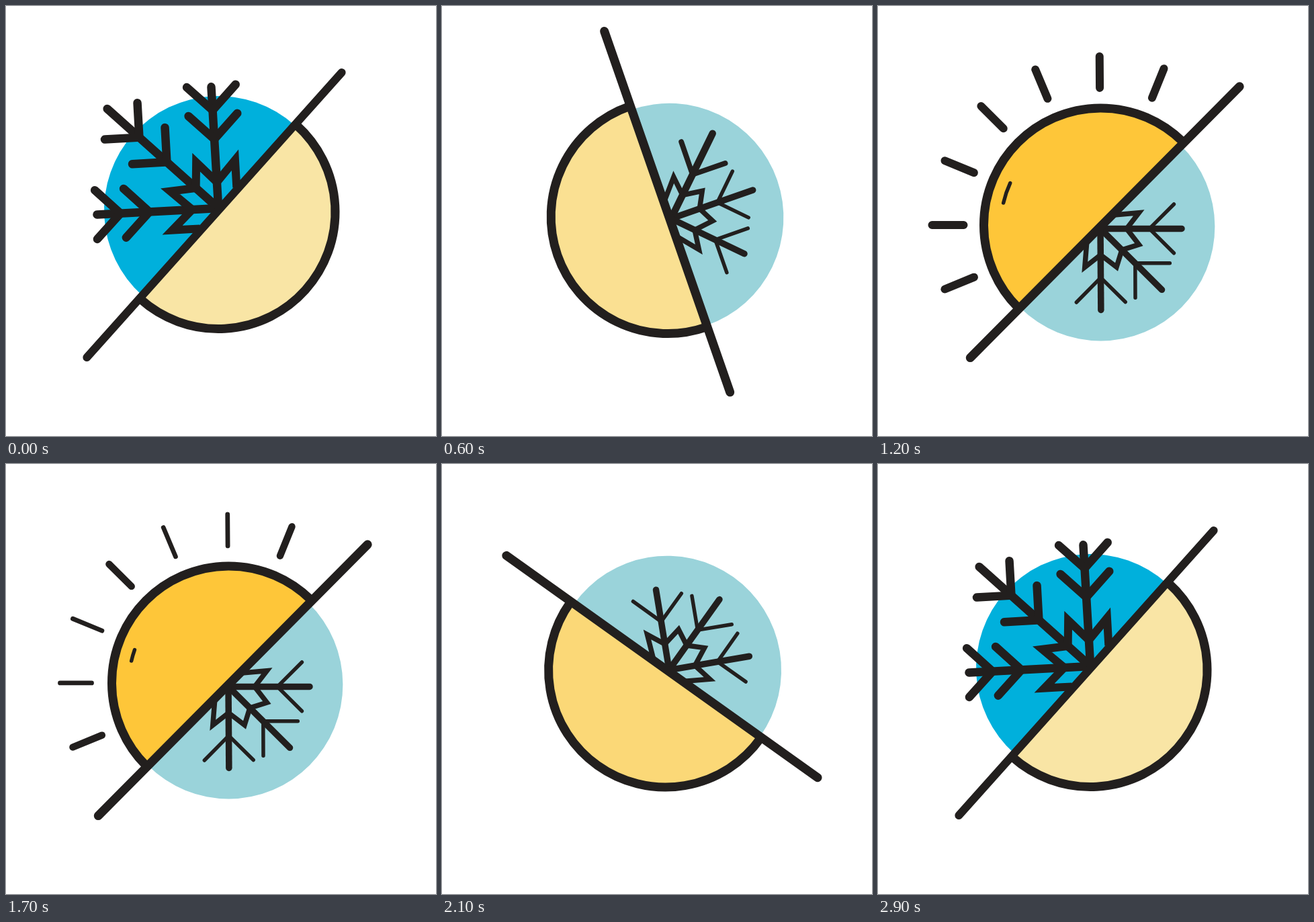
An HTML page with a canvas for the animation above (3 s loop, 640x640 px).

```html
<!DOCTYPE html>
<html lang="en">
<head>
<meta charset="utf-8">
<title>Winter and summer</title>
<style>
html, body { margin: 0; width: 100%; height: 100%; overflow: hidden; background: #fff; }
canvas { display: block; width: 640px; height: 640px; }
</style>
</head>
<body>
<canvas id="stage" width="640" height="640"></canvas>
<script>
const ctx = document.getElementById('stage').getContext('2d');
const LOOP = 3000, STEP = 100;
const RAD = Math.PI / 180;
const INK = '#221f1e';
const ICE = [0, 176, 220], THAW = [154, 211, 218];
const PALE = [249, 229, 165], GOLD = [254, 198, 57];

// Winter pose; everything turns around PIVOT. AXIS points along the middle arm.
const PIVOT = [324, 316], HUB = [316.2, 301], SUN = [316, 306.5], DISC = [316, 304], BAR = [310, 311];
const AXIS = -138.2;

const poses = [
  [200, -3], [300, 4], [400, 30], [500, 65], [600, 119], [800, 185.8], [1000, 183], [1700, 183],
  [1800, 189], [1900, 173], [2000, 123], [2100, 83.7], [2200, 27], [2400, -3], [2500, 0]
];

const mix = (a, b, k) => a + (b - a) * k;
const ramp = (t, start, end) => Math.min(1, Math.max(0, (t - start) / (end - start)));
const pulse = (t, rise, full, fall, gone) => ramp(t, rise, full) - ramp(t, fall, gone);
const blend = (a, b, k) => `rgb(${a.map((v, i) => Math.round(mix(v, b[i], k)))})`;

function turn(t) {
  const next = poses.findIndex(([time]) => t < time);
  if (next < 1) return 0;
  const [t0, a0] = poses[next - 1], [t1, a1] = poses[next];
  return mix(a0, a1, ramp(t, t0, t1));
}

// A point at an angle measured from AXIS.
function polar(angle, dist, from = HUB) {
  const a = (AXIS + angle) * RAD;
  return [from[0] + dist * Math.cos(a), from[1] + dist * Math.sin(a)];
}

function stroke(points, width, cap = 'round') {
  if (width < 0.1) return;
  ctx.beginPath();
  points.forEach(p => ctx.lineTo(...p));
  ctx.lineWidth = width;
  ctx.lineCap = cap;
  ctx.stroke();
}

function arc(center, radius, from, to) {
  ctx.beginPath();
  ctx.arc(...center, radius, (AXIS + from) * RAD, (AXIS + to) * RAD);
}

function chevron(angle, dist, width) {
  const tip = polar(angle, dist);
  stroke([polar(angle - 45, 51.5, tip), tip, polar(angle + 45, 51.5, tip)], width);
}

function flake(t, frost) {
  [400, 200, 270].forEach((melt, i) => {
    const side = i - 1, off = Math.abs(side), angle = 44.8 * side;
    const regrow = 2440 - 50 * side;
    const reach = 1 - pulse(t, melt, melt + 300, regrow, regrow + 300);
    stroke([HUB, polar(angle, mix(129 - 8 * off, 222 - 41 * off, reach))], 9.5 + 3 * reach);
    chevron(angle, 73 + 30 * frost, 5.5 + 7 * reach);
    chevron(angle, 158 - 12 * off, 12.5 * frost);
  });

  const size = 1 - pulse(t, 200, 600, 2480, 2780);
  const star = [];
  for (let i = -4; i <= 4; i++) {
    const n = Math.abs(i);
    const dist = n % 2 ? 62 + 14 * size : n === 4 ? 29 + 12 * size : 45 - 3 * n;
    star.push(polar(22.4 * i, dist));
  }
  stroke(star, 7.5 + 4.5 * frost, 'butt');
}

function rays(t) {
  for (let i = 0; i < 7; i++) {
    const angle = 180 + 22.4 * (3 - i);
    const fade = 1600 + 60 * Math.cos(i * 120 * RAD);
    const width = 12 * pulse(t, 755, 1100, fade, fade + 300);
    stroke([polar(angle, 204, SUN), polar(angle, 251, SUN)], width);
  }
}

function glint(t) {
  const span = 36 * pulse(t, 1100, 1400, 1500, 1745);
  if (!span) return;
  arc(SUN, 148.5, 148, 148 + span);
  ctx.lineWidth = 5.5;
  ctx.lineCap = 'round';
  ctx.stroke();
}

function draw(t) {
  const frost = 1 - pulse(t, 200, 520, 2360, 2660);
  const warmth = pulse(t, 500, 1070, 1800, 2320);

  ctx.fillStyle = '#fff';
  ctx.fillRect(0, 0, 640, 640);
  ctx.strokeStyle = INK;

  ctx.save();
  ctx.translate(...PIVOT);
  ctx.rotate(turn(t) * RAD);
  ctx.translate(-PIVOT[0], -PIVOT[1]);

  arc(DISC, 170, 0, 360);
  ctx.fillStyle = blend(THAW, ICE, frost);
  ctx.fill();
  flake(t, frost);

  arc(SUN, 174, 90, 270);
  ctx.fillStyle = blend(PALE, GOLD, warmth);
  ctx.fill();
  ctx.lineWidth = 13;
  ctx.lineCap = 'butt';
  ctx.stroke();

  rays(t);
  glint(t);
  stroke([polar(-90, 284.5, BAR), polar(90, 284.5, BAR)], 12 + pulse(t, 200, 500, 2500, 2800));
  ctx.restore();
}

function tick() {
  const t = performance.now() % LOOP;
  draw(Math.floor(t / STEP) * STEP);
  requestAnimationFrame(tick);
}
tick();
</script>
</body>
</html>
```
